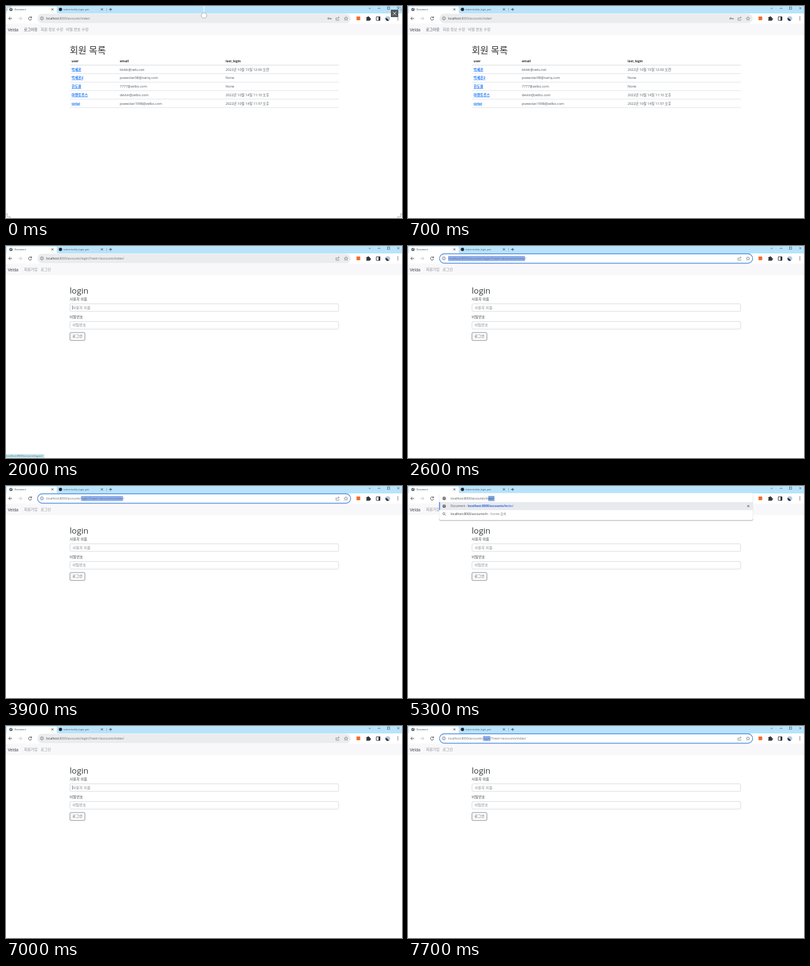
Recreate the animation shown at these times as an HTML page. Size 640 by 343 pixels, loop 8000 ms.

```html
<!DOCTYPE html>
<html lang="ko">
<head>
<meta charset="utf-8">
<title>Document</title>
<style>
html, body { margin: 0; width: 100%; height: 100%; overflow: hidden; background: #fff; }
svg { display: block; width: 100vw; height: 100vh; font-family: "Open Sans", "Noto Sans CJK KR", sans-serif; }
</style>
</head>
<body>
<svg id="stage" viewBox="0 0 640 343"></svg>
<script>
const LOOP = 8000, STEP = 100;
const HOST = 'localhost', PATH = ':8000/accounts/';
const URL_X = 65, TAIL_X = 121.5, URL_END = 189;
const DARK = '#333639', GRAY = '#6a6e73', SELECT = '#8fb2f3';

const text = (x, y, s, size, fill = DARK, extra = '') =>
  `<text x="${x}" y="${y}" font-size="${size}" fill="${fill}" ${extra}>${s}</text>`;
const rect = (x, y, w, h, fill, r = 0, extra = '') =>
  `<rect x="${x}" y="${y}" width="${w}" height="${h}" rx="${r}" fill="${fill}" ${extra}/>`;
const line = (d, color = DARK, w = 0.8) =>
  `<path d="${d}" fill="none" stroke="${color}" stroke-width="${w}"/>`;
const dot = (x, y, r, fill, extra = '') => `<circle cx="${x}" cy="${y}" r="${r}" fill="${fill}" ${extra}/>`;
const cross = (x, y, r, color, w) =>
  line(`M${x - r} ${y - r}l${2 * r} ${2 * r}m0 ${-2 * r}l${-2 * r} ${2 * r}`, color, w);
const bold = 'font-weight="700"';
const outline = (color, w) => `stroke="${color}" stroke-width="${w}"`;

const globe = (x, y) => dot(x, y, 2.7, '#55595e') +
  line(`M${x - 2} ${y - .6}l1.6 .5l.5 1.6M${x + .2} ${y - 2}l.4 1.2l1.4 .3`, '#fff', 0.7);
const info = () => dot(58, 20, 2.5, 'none', outline('#5f6368', .7)) + line('M58 19.6v1.8M58 18.4v.7', '#5f6368', .7);

function tabs(loading) {
  return rect(0, 0, 640, 12, '#b9e3fa') +
    '<path d="M0 12Q1 12 1 10V3Q1 1 3 1H80Q82 1 82 3V10Q82 12 84 12Z" fill="#fff"/>' +
    (loading ? '' : globe(8, 5.6)) +
    text(13.7, 7, 'Document', 3.75) + cross(75, 5.5, 1.7) +
    dot(88, 5.5, 2.7, '#24292f') + text(93, 7, 'tobren/velda_login_pair', 3.8, '#4c5157') +
    cross(155, 5.5, 1.7) + line('M162.5 3v5.5', '#7f98a8', .6) + line('M166.5 5.5h5M169 3v5') +
    line('M586.3 3l1.5 1.5l1.5-1.5M601 3.8h4', '#43545f', .7) +
    rect(616.6, 1.8, 3.4, 3.4, 'none', 0, outline('#43545f', .7)) + cross(634, 3.6, 1.7, '#43545f', .7);
}

function toolbar(loading) {
  return rect(0, 12, 640, 16.5, '#fff') +
    line('M10 20.2H4.5M7 17.6l-2.6 2.6l2.6 2.6') +
    line('M20 20.2h5.5M23 17.6l2.6 2.6l-2.6 2.6', '#b4b7ba') +
    (loading ? cross(39, 20.2, 2.1) : line('M41 18.6A2.6 2.6 0 1 0 41.5 21M41.4 17v2.1h-2.2')) +
    rect(566.5, 17, 6, 6, '#f36b2b', .8) +
    '<path d="M582.3 18h2a1.2 1.2 0 1 1 2.3 0h1.7v2a1.2 1.2 0 1 1 0 2.3v1.4h-6v-1.8a1.2 1.2 0 0 0 0-2.1z" fill="#333639"/>' +
    rect(598.4, 17.3, 6, 6, 'none', .5, outline(DARK, .9)) + rect(602, 17.2, 2.6, 6.2, DARK) +
    dot(617, 20.2, 3.8, '#b7c7d9') + '<path d="M613.4 19Q617 20 619 23.5A3.8 3.8 0 0 1 613.4 19" fill="#29364a"/>' +
    [17.8, 20.2, 22.6].map(y => dot(633.3, y, .7, DARK)).join('');
}

const actions = key =>
  (key ? dot(521.2, 20.2, 1.2, 'none', outline('#5f6368', .8)) + line('M522.4 20.2h3.4v1.5M524.2 20.2v1.2', '#5f6368') : '') +
  line('M534.5 19h-1.2v4h5v-1.4M534.8 21.2q.4-2.5 3.5-2.6m-1.5-1.6l1.7 1.6l-1.7 1.6', '#5f6368', .6) +
  line('M549.5 17.2l.9 2l2.1 .2l-1.6 1.4l.5 2.1l-1.9-1.1l-1.9 1.1l.5-2.1l-1.6-1.4l2.1-.2z', '#5f6368', .6);

function omnibox({ tail, focus, sel, key }) {
  return rect(51, 12.6, 506, 15.2, focus ? '#fff' : '#ebecee', 7.6, focus ? outline('#4285e0', 1.2) : '') +
    info() + actions(key) +
    (sel ? rect(sel[0], 16, sel[1] - sel[0], 8.4, SELECT) : '') +
    text(URL_X, 21.7, `<tspan fill="${focus ? GRAY : DARK}">${HOST}</tspan>${PATH}`, 4.85, GRAY) +
    text(TAIL_X, 21.7, tail, tail.length > 8 ? 5.15 : 4.85, GRAY);
}

function suggestions(typed, submitted) {
  const word = 'index/', shown = submitted ? word : word.slice(0, typed);
  const typedWidth = [4.2, 7.2, 9.9, 12.4][typed - 2];
  const base = HOST + PATH;
  return rect(50, 12.5, 508, 44, '#c3c7cb', 3) + rect(50.3, 11.5, 507.4, 43.6, '#fff', 3) +
    rect(50.3, 26, 507.4, 13, '#e8eaed') + rect(50.3, 26, 1.3, 13, '#3b78e7') +
    globe(58.5, 32.6) + cross(550, 32.5, 1.6) +
    text(69, 34.2, `Document - <tspan fill="#2860e0"><tspan ${bold}>${base}${shown}</tspan>${word.slice(shown.length)}</tspan>`, 4.8, '#50555a') +
    dot(58, 44.7, 1.7, 'none', outline('#5f6368', .8)) + line('M59.2 46l1.8 1.8', '#5f6368') +
    text(69, 47.2, `${base}${word.slice(0, typed)}<tspan fill="#777b80"> - Sorvex 검색</tspan>`, 4.8) +
    (submitted ? '' : globe(58.5, 20) +
      rect(125.5 + typedWidth, 16, 14.2 - typedWidth, 8.4, '#7fa9e6') +
      text(69, 21.7, base + word, 4.85, '#50555a'));
}

const nav = items => rect(0, 28.5, 640, 18.5, '#f8f8fb') + text(3, 40.8, 'Velda', 6.67) +
  items.map(([x, s, c]) => text(x, 40.2, s, 6, c)).join('');

function listPage() {
  const cols = [106, 184, 355];
  const rows = [
    ['박세온', 'bbbb@nelu.net', '2022년 10월 15일 12:00 오전'],
    ['박세온2', 'psewolan98@nariq.com', 'None'],
    ['한도율', '7777@zelbo.com', 'None'],
    ['마렌토루스', 'devlin@zelbo.com', '2022년 10월 14일 11:10 오후'],
    ['tirlel', 'psewolan1998@zelbo.com', '2022년 10월 14일 11:57 오후']
  ];
  return nav([[29, '로그아웃', '#44484c'], [56, '회원 정보 수정', '#8d9094'], [97, '비밀 번호 수정', '#8d9094']]) +
    text(103, 77.3, '회원 목록', 14.8) +
    ['user', 'email', 'last_login'].map((s, i) => text(cols[i], 91, s, 5.2, '#24282c', bold)).join('') +
    line('M103 95.7h435', '#c8ccd1', .7) +
    rows.map((row, r) => {
      const y = 104.7 + 13.7 * r;
      return text(cols[0], y, row[0], 5.7, '#1b76fb', bold + ' text-decoration="underline"') +
        text(cols[1], y, row[1], 5.5, '#50555a') + text(cols[2], y, row[2], 5.5, '#50555a') +
        line(`M103 ${y + 4.8}h435`, '#d5dae0', .7);
    }).join('');
}

function loginPage(caret) {
  const field = (y, label, s) => text(103, y, label, 5.8, '#44484c') +
    rect(103.4, y + 5.4, 434.2, 12.2, '#fff', 2, outline('#ced4da', .8)) + text(107.7, y + 13.5, s, 5.9, '#85898e');
  return nav([[29, '회원가입', '#8d9094'], [56, '로그인', '#8d9094']]) +
    text(103, 77, 'login', 13.33) +
    field(88.2, '사용자 이름', '사용자 이름') + field(116.8, '비밀번호', '비밀번호') +
    (caret ? line('M107.4 96.2v6.6', DARK, .6) : '') +
    rect(103.4, 140, 24.2, 12.8, '#fff', 1.8, outline('#6c757d', .8)) + text(107.3, 148.4, '로그인', 6, '#50555a');
}

const captureFrame = () =>
  line('M0 7H2V2H7V0M640 7H638V2H633V0M0 336H2V341H7V343M640 336H638V341H633V343', '#9a9da0', .8) +
  line('M320 0v11', '#fff', 1) + dot(320, 15.3, 4.4, '#fff', outline('#8c9196', .7)) +
  rect(622, 6, 12, 12, '#55585c') + cross(628, 12, 2.6, '#fff', .8);

const statusBubble = opacity => `<g opacity="${opacity}">` + rect(0, 336.5, 62, 6.5, '#c9e8ef', 1) +
  text(0.3, 341.4, HOST + PATH + 'logout/', 3.95, '#4b5a60') + '</g>';

const within = (t, a, b) => t >= a && t < b;

function selection(t) {
  if (within(t, 2400, 3000) || within(t, 7300, 7500)) return [URL_X, URL_END];
  if (within(t, 3000, 3600)) return [URL_END, URL_END + .6];
  if (within(t, 3600, 5300)) return [Math.max(TAIL_X, 172 - (t - 3600) * .17), URL_END];
  if (within(t, 7500, 7700)) return [TAIL_X, TAIL_X + .6];
  if (t >= 7700) return [TAIL_X, 133.2];
}

function scene(t) {
  const list = t < 2000;
  const loading = within(t, 1900, 2000) || within(t, 6000, 6200);
  const typing = within(t, 5300, 6000);
  const caret = within(t, 2000, 2400) || within(t, 6000, 6500) || within(t, 7000, 7300);
  const typed = t < 5400 ? 2 : t < 5500 ? 3 : t < 5700 ? 4 : 5;
  const bubble = Math.min(1, (t - 1000) / 300, (2300 - t) / 300);
  return tabs(loading) + toolbar(loading) + (list ? listPage() : loginPage(caret)) +
    (within(t, 5300, 6100) ? suggestions(typed, !typing) : '') +
    (typing ? '' : omnibox({
      tail: list || within(t, 6000, 6200) ? 'index/' : 'login/?next=/accounts/index/',
      focus: within(t, 2400, 5300) || t >= 7300,
      sel: selection(t),
      key: list
    })) +
    (bubble > 0 ? statusBubble(bubble) : '') + (t < 200 ? captureFrame() : '');
}

const stage = document.getElementById('stage');
let last = -1;
function draw() {
  const t = Math.floor(performance.now() % LOOP / STEP) * STEP;
  if (t !== last) stage.innerHTML = scene(last = t);
  requestAnimationFrame(draw);
}
draw();
</script>
</body>
</html>
```
